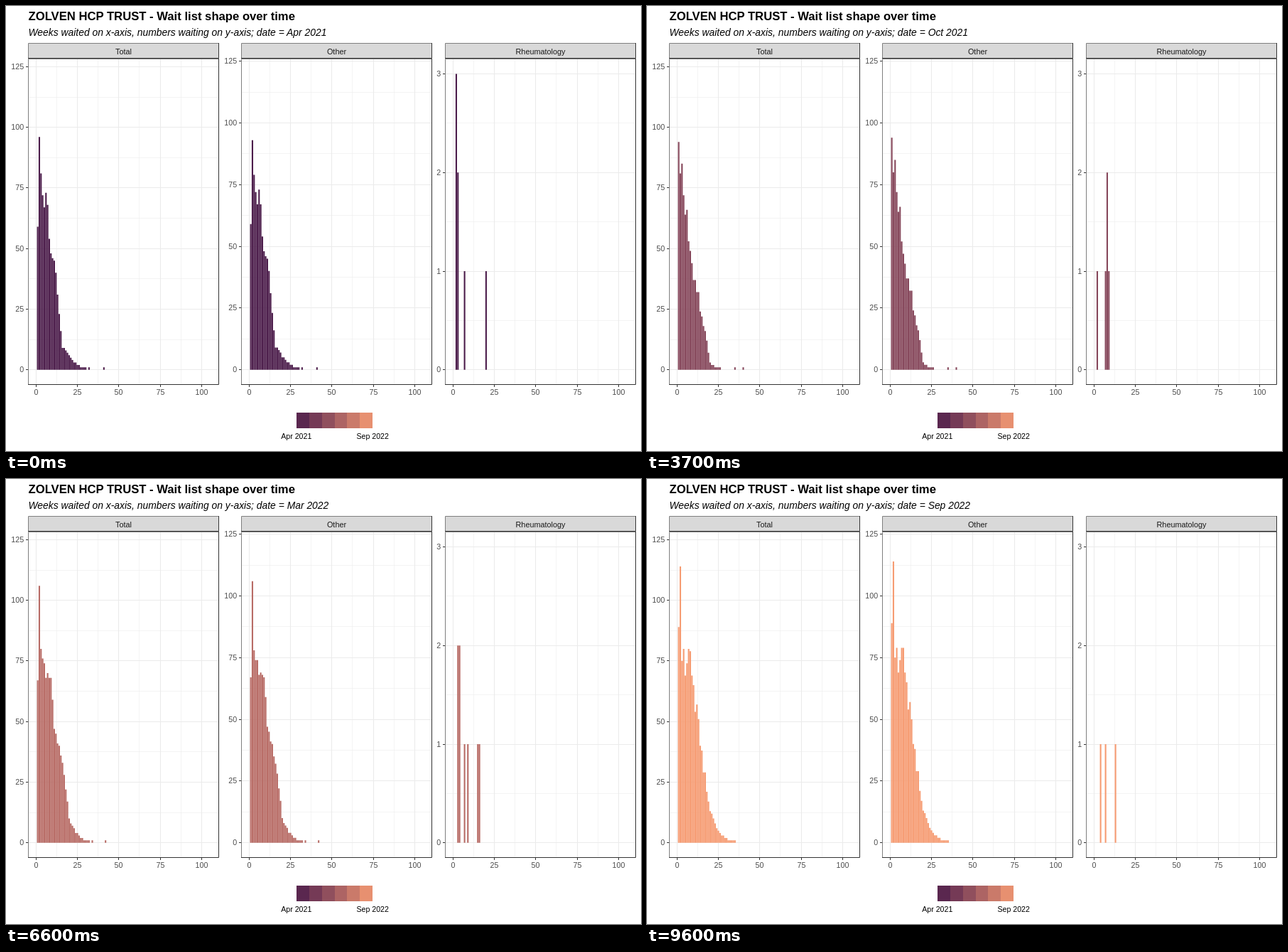
Recreate the animation shown at these times as an HTML page. Size 894 px wide and 626 px high, loop 10000 ms.

```html
<!DOCTYPE html>
<html lang="en">
<head>
<meta charset="utf-8">
<title>Wait list shape over time</title>
<style>
  html, body { margin: 0; width: 100%; height: 100%; overflow: hidden; background: #fff; }
  svg { display: block; width: 894px; height: 626px; font-family: "Liberation Sans", Arial, sans-serif; }
  .title { font-size: 16.67px; font-weight: bold; }
  .sub { font-size: 13.89px; font-style: italic; }
  .strip { font-size: 10.85px; fill: #1a1a1a; text-anchor: middle; }
  .axis { font-size: 10.7px; fill: #4d4d4d; }
  .key { font-size: 10.6px; text-anchor: middle; }
  .mid { text-anchor: middle; }
  .end { text-anchor: end; }
</style>
</head>
<body>
<svg id="stage" viewBox="0 0 894 626"></svg>
<script>
const LOOP = 10000, MONTHS = 18, LAST_WEEK = 50;
const BASE = 511.7, STEP = 2.33, BAR = 0.9 * STEP, WIDTH = 268;
const NAMES = "Jan Feb Mar Apr May Jun Jul Aug Sep Oct Nov Dec".split(" ");
const PANELS = [
  { name: "Total", left: 31.5, unit: 3.41, tick: 25, top: 125 },
  { name: "Other", left: 331.5, unit: 3.472, tick: 25, top: 125 },
  { name: "Rheumatology", left: 618.5, unit: 138.7, tick: 1, top: 3 }
];

// Outline of the queue at a few weeks, and the weeks waited by each rheumatology patient
const WEEKS = [1, 2, 3, 8, 12, 16, 20];
const KEYS = [
  { month: 0, queue: [59, 93, 79, 58, 39, 9, 6], rheum: [2, 2, 2, 3, 3, 7, 20] },
  { month: 3, queue: [83, 81, 95, 38, 22, 13, 2], rheum: [3, 3, 6, 8, 10, 10] },
  { month: 6, queue: [94, 80, 85, 45, 34, 19, 3], rheum: [2, 7, 8, 8, 9] },
  { month: 8, queue: [55, 39, 96, 76, 40, 30, 4], rheum: [2, 2, 3, 3, 6, 7, 7, 7, 11, 17] },
  { month: 11, queue: [67, 106, 78, 66, 46, 34, 10], rheum: [3, 3, 4, 4, 7, 9, 15, 16] },
  { month: 15, queue: [31, 113, 111, 53, 45, 19, 10], rheum: [3, 5, 8, 18] },
  { month: 17, queue: [89, 114, 75, 72, 54, 31, 14], rheum: [4, 7, 13] }
];

const noise = (m, w) => { const s = Math.sin(m * 12.99 + w * 78.23) * 43758.55; return s - Math.floor(s); };
const mix = (a, b, t) => a + (b - a) * t;
const shade = t => `color-mix(in lab, #F69C73 ${(t * 100).toFixed(2)}%, #4C1D4B)`;
const dateOf = m => `${NAMES[(m + 3) % 12]} ${2021 + Math.floor((m + 3) / 12)}`;
const count = weeks => weeks.reduce((c, w) => (c[w] = (c[w] || 0) + 1, c), []);

// Straight between the outline points, then a fading tail
function outline(queue, w) {
  if (w > 20) return queue[6] * 0.82 ** (w - 20) - 0.3;
  const i = WEEKS.findIndex(k => k >= w);
  if (WEEKS[i] === w) return queue[i];
  return mix(queue[i - 1], queue[i], (w - WEEKS[i - 1]) / (WEEKS[i] - WEEKS[i - 1]));
}

function monthData(m) {
  const a = KEYS.findLast(k => k.month <= m), b = KEYS.find(k => k.month >= m);
  const age = m - a.month, t = age && age / (b.month - a.month);
  const other = [], total = [];

  // Waiting patients grow about 4.35 weeks older each month, and two new ones join
  let patients = a.rheum;
  if (age) {
    patients = a.rheum.map(w => Math.floor(w + age * 4.35)).filter((w, i) => w < 20 && noise(m, i) > 0.3);
    patients.push(2 + Math.floor(noise(m, 60) * 3), 5 + Math.floor(noise(m, 61) * 4));
  }
  const rheum = count(patients);
  const strays = [27, 34].map(w => w + Math.floor(noise(m, w) * 14));

  for (let w = 1; w <= LAST_WEEK; w++) {
    const jitter = w > 3 ? 0.9 + 0.2 * noise(m, w) : 1;
    const h = Math.round(mix(outline(a.queue, w), outline(b.queue, w), t) * jitter);
    other[w] = Math.max(h, strays.includes(w) ? 1 : 0);
    total[w] = other[w] + (rheum[w] || 0);
  }
  return [total, other, rheum];
}

const zeroOf = p => p.left + 10.8;
function barPath(heights, p) {
  let d = "";
  heights.forEach((v, w) => {
    const x = zeroOf(p) + STEP * w - BAR / 2;
    if (v) d += `M${x.toFixed(2)} ${(BASE - v * p.unit).toFixed(2)}h${BAR}V${BASE}h${-BAR}z`;
  });
  return d;
}
const DATA = Array.from({ length: MONTHS }, (_, m) => monthData(m).map((h, i) => barPath(h, PANELS[i])));

const stage = document.getElementById("stage");
function add(tag, attrs, text) {
  const el = document.createElementNS("http://www.w3.org/2000/svg", tag);
  for (const k in attrs) el.setAttribute(k, attrs[k]);
  if (text !== undefined) el.textContent = text;
  return stage.appendChild(el);
}
const label = (x, y, cls, text) => add("text", { x, y, class: cls }, text);
const line = (d, color, width) => add("path", { d, stroke: color, "stroke-width": width, fill: "none" });
const snap = v => Math.floor(v) + 0.5;

function frameBox(x, y, height, fill) {
  add("rect", { x, y, width: WIDTH, height, fill });
  line(`M${x} ${y + height}V${y}H${x + WIDTH}`, "#7f7f7f", 1);
  line(`M${x - 0.5} ${y + height}H${x + WIDTH}V${y - 0.5}`, "#333", 1);
}

function drawPanel(p) {
  const right = p.left + WIDTH;
  const yAt = v => snap(BASE - v * p.unit);
  const xAt = v => snap(zeroOf(p) + v * STEP);
  let minor = "", major = "", ticks = "";
  for (let x = 0; x <= 100; x += 25) {
    major += `M${xAt(x)} 75V532`;
    if (x < 100) minor += `M${xAt(x + 12.5)} 75V532`;
    ticks += `M${xAt(x)} 533v3`;
    label(xAt(x), 547.3, "axis mid", x);
  }
  for (let y = 0; y <= p.top; y += p.tick) {
    major += `M${p.left} ${yAt(y)}H${right}`;
    if (y < p.top) minor += `M${p.left} ${yAt(y + p.tick / 2)}H${right}`;
    ticks += `M${p.left - 3.5} ${yAt(y)}h3`;
    label(p.left - 6.3, yAt(y) + 3.9, "axis end", y);
  }
  line(minor, "#EBEBEB", 0.55);
  line(major, "#EBEBEB", 1.1);
  line(ticks, "#333", 1);
  const bars = add("path", {});
  frameBox(p.left, 74.5, 458, "none");
  frameBox(p.left, 52.5, 21, "#D9D9D9");
  label(p.left + WIDTH / 2, 67.5, "strip", p.name);
  return bars;
}

label(31.5, 20, "title", "ZOLVEN HCP TRUST - Wait list shape over time");
const sub = label(31.5, 42, "sub", "");
const bars = PANELS.map(drawPanel);
for (let i = 0; i < 6; i++) {
  const [x, end] = [i, i + 1].map(k => Math.round(409 + k * 107.2 / 6));
  add("rect", { x, y: 572, width: end - x, height: 22 }).style.fill = shade((i + 0.5) / 6);
}
label(408.8, 609, "key", dateOf(0));
label(516.2, 609, "key", dateOf(MONTHS - 1));

// Months last 600 ms, later ones 500 ms; bars switch 100 ms ahead of the date
const startOf = m => 100 + 600 * m - 100 * Math.max(0, m - 10);
function monthAt(t) {
  let m = 0;
  while (m < MONTHS - 1 && t >= startOf(m + 1)) m++;
  return m;
}

let shownBars = -1, shownDate = -1;
function frame() {
  const t = performance.now() % LOOP;
  const b = monthAt(t + 100), d = monthAt(t);
  if (b !== shownBars) {
    bars.forEach((el, i) => {
      el.setAttribute("d", DATA[b][i]);
      el.style.fill = shade(b / (MONTHS - 1));
    });
    shownBars = b;
  }
  if (d !== shownDate) {
    sub.textContent = `Weeks waited on x-axis, numbers waiting on y-axis; date = ${dateOf(d)}`;
    shownDate = d;
  }
  requestAnimationFrame(frame);
}
frame();
</script>
</body>
</html>
```
